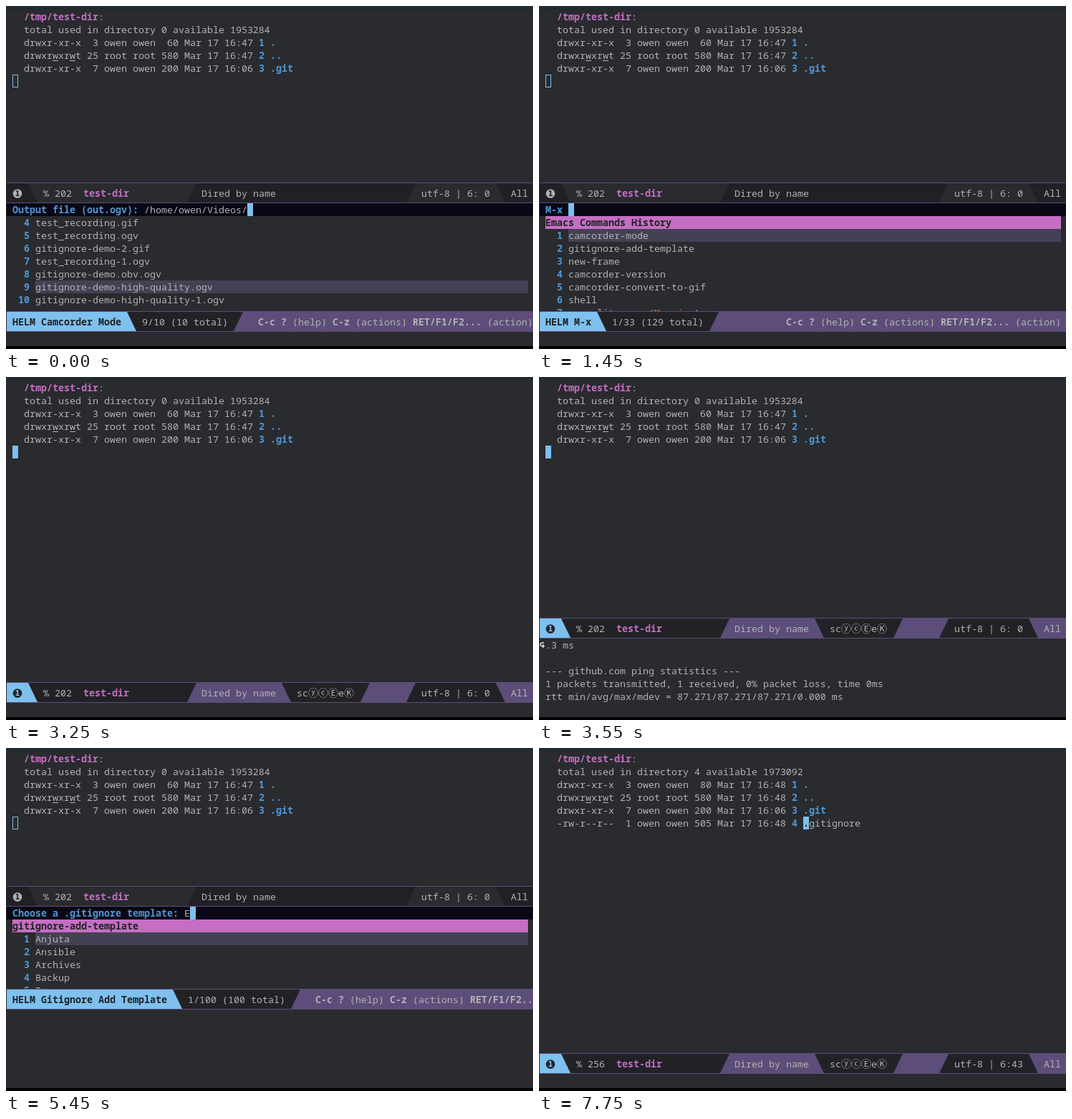
An HTML page for the animation above (8 s loop, 736 by 480 pixels).

```html
<!DOCTYPE html>
<html lang="en">
<head>
<meta charset="utf-8">
<title>Adding a gitignore template</title>
<style>
html, body { margin: 0; width: 100%; height: 100%; overflow: hidden; background: #292b2e; }
svg { display: block; width: 736px; height: 480px; }
text { font: 13.3333px "Noto Sans Mono", "DejaVu Sans Mono", monospace; fill: #b2b2b2; white-space: pre; }
.b, .blue, .pink, .dark { font-weight: bold; }
.blue, .match { fill: #4f97d7; }
.pink { fill: #c56ec3; }
.dark { fill: #222226; }
.ring { font: 14px "Noto Sans CJK JP", "Noto Sans CJK", "DejaVu Sans", sans-serif; }
.num { font: bold 10px "DejaVu Sans", sans-serif; text-anchor: middle; }
rect { shape-rendering: crispEdges; }
</style>
</head>
<body>
<svg id="stage" viewBox="0 0 736 480"></svg>
<script>
const LOOP = 8000, CHAR = 8, ROW = 18, BAR = 29, SLANT = 13;
const BG = '#292b2e', SKY = '#7ec0ee', VIOLET = '#5d4d7a', DARK = '#222226',
      DIM = '#212026', SELECT = '#444155', PINK = '#c56ec3', FG = '#b2b2b2';
const USER = 'owen';
const stage = document.getElementById('stage');
let out;

const rect = (x, y, w, h, fill) => out.push(`<rect x="${x}" y="${y}" width="${w}" height="${h}" fill="${fill}"/>`);
const poly = (points, fill) => out.push(`<polygon points="${points.join(' ')}" fill="${fill}"/>`);
const text = (x, y, s, cls = '') => out.push(`<text x="${x}" y="${y}" class="${cls}">${s}</text>`);

// Draws text, class, text, class... one after the other; returns the end.
function runs(x, y, ...parts) {
  for (let i = 0; i < parts.length; i += 2) {
    text(x, y, parts[i], parts[i + 1]);
    x += parts[i].length * CHAR;
  }
  return x;
}
const row = (x, y, ...parts) => runs(x, y + 14, ...parts);

function cursor(x, y, filled) {
  if (filled) rect(x, y, CHAR, ROW, SKY);
  else out.push(`<rect x="${x + .5}" y="${y + .5}" width="7" height="17" fill="none" stroke="${SKY}"/>`);
}

// Each segment is [top x, bottom x, fill] and reaches to the right edge.
function bar(y, ...segments) {
  rect(1, y, 735, BAR, VIOLET);
  for (const [top, bottom, fill] of segments)
    poly([[top, y + 1], [736, y + 1], [736, y + BAR - 1], [bottom, y + BAR - 1]], fill);
}

function listing(active, done) {
  const time = done ? '16:48' : '16:47';
  const file = (n, mode, links, owner, size, at, name, cls = 'blue') =>
    row(25, 24 + n * ROW, `${mode} ${links} ${owner} ${owner} ${size} Mar 17 ${at} `, '', n + ' ', 'blue', name, cls);
  row(25, 6, '/tmp/test-dir', 'pink', ':', '');
  row(25, 24, `total used in directory ${done ? '4 available 1973092' : '0 available 1953284'}`, '');
  file(1, 'drwxr-xr-x', ' 3', USER, done ? ' 80' : ' 60', time, '.');
  file(2, 'drwxrwxrwt', '25', 'root', '580', time, '..');
  file(3, 'drwxr-xr-x', ' 7', USER, '200', '16:06', '.git');
  rect(65, 76, CHAR, 1, FG);
  rect(89, 76, CHAR, 1, FG);
  if (!done) return cursor(9, 96, active);
  file(4, '-rw-r--r--', ' 1', USER, '505', '16:48', '.gitignore', '');
  cursor(369, 96, true);
  row(369, 96, '.', 'dark');
}

function diredBar(y, active, done) {
  const base = y + 20;
  if (active)
    bar(y, [1, 1, SKY], [31, 44, DARK], [266, 253, VIOLET], [385, 398, DARK],
      [508, 495, VIOLET], [572, 559, DARK], [684, 697, VIOLET]);
  else
    bar(y, [1, 1, DIM], [31, 44, BG], [266, 253, DIM], [572, 559, BG], [684, 697, DIM]);
  out.push(`<circle cx="16" cy="${y + 15.5}" r="6.3" fill="${active ? DARK : FG}"/>
    <text x="16" y="${y + 19}" class="num" style="fill:${active ? SKY : DIM}">1</text>`);
  runs(52, base, done ? '% 256  ' : '% 202  ', '', 'test-dir', 'pink');
  text(273, base, 'Dired by name');
  if (active) {
    text(406, base, 'sc');
    [...'ⓨⓒⒺ'].forEach((c, i) => text(422 + i * 14, base, c, 'ring'));
    text(464, base, 'e');
    text(472, base, 'Ⓚ', 'ring');
  }
  text(580, base, done ? 'utf-8 | 6:43' : 'utf-8 | 6: 0');
  text(705, base, 'All');
}

function helmBar(y, name, count) {
  const base = y + 20;
  const a = 9 + (name.length + 1) * CHAR, b = a + SLANT + (count.length + 2) * CHAR;
  bar(y, [1, 1, SKY], [a, a + SLANT, DARK], [b + SLANT, b, VIOLET]);
  text(9, base, name, 'dark');
  text(a + SLANT + CHAR, base, count);
  runs(Math.max(345, b + SLANT + 21), base, 'C-c ?', 'b', ' (help) ', '', 'C-z', 'b',
    ' (actions) ', '', 'RET/F1/F2...', 'b', ' (action)', '');
}

function prompt(y, label, typed) {
  rect(1, y, 735, ROW, '#0a0814');
  cursor(row(9, y, label + ' ', 'blue', typed, ''), y, true);
}

function header(y, title) {
  rect(9, y, 720, ROW, PINK);
  row(9, y, title, 'dark');
}

function item(y, n, name, { selected, match = 0, key = '' } = {}) {
  if (selected) rect(41, y, 688, ROW, SELECT);
  else if (match) rect(41, y, match * CHAR, ROW, '#293239');
  row(17, y, String(n).padStart(2), 'blue');
  const end = row(41, y, name.slice(0, match), 'match', name.slice(match), '');
  if (key) out.push(`<text x="${end}" y="${y + 14}"> (<tspan fill="#ce537a" style="fill:#dc752f">${key}</tspan>)</text>`);
}

const tildes = (y, n) => { while (n--) row(1, y + n * ROW, '~', ''); };

function outputFile() {
  listing(false);
  diredBar(247, false);
  prompt(276, 'Output file (out.ogv):', `/home/${USER}/Videos/`);
  ['test_recording.gif', 'test_recording.ogv', 'gitignore-demo-2.gif', 'test_recording-1.ogv',
   'gitignore-demo.obv.ogv', 'gitignore-demo-high-quality.ogv', 'gitignore-demo-high-quality-1.ogv']
    .forEach((name, i) => item(294 + i * ROW, i + 4, name, { selected: i === 5 }));
  helmBar(427, 'HELM Camcorder Mode', '9/10 (10 total)');
}

function dired(done) {
  listing(true, done);
  diredBar(427, true, done);
}

function commands(typed, filtered) {
  listing(false);
  diredBar(247, false);
  prompt(276, 'M-x', typed);
  header(294, 'Emacs Commands History');
  if (filtered) {
    item(312, 1, 'gitignore-add-template', { selected: true, match: 13 });
    header(348, 'Emacs Commands');
    item(366, 2, 'gitignore-add-template', { match: 13 });
    tildes(384, 2);
  } else {
    ['camcorder-mode', 'gitignore-add-template', 'new-frame', 'camcorder-version',
     'camcorder-convert-to-gif', 'shell']
      .forEach((name, i) => item(312 + i * ROW, i + 1, name, { selected: !i }));
    item(420, 7, 'sp-split-sexp', { key: 'M-m j s' });
  }
  helmBar(427, 'HELM M-x', filtered ? '1/1 (2 total)' : '1/33 (129 total)');
  rect(0, 456, 736, 20, BG);
}

function ping(shown) {
  listing(true);
  diredBar(337, true);
  if (!shown) return;
  out.push(`<path d="M7 372H4a2 2 0 0 0 0 4.500H6M5 374.500l2 2-2 2.500" fill="none" stroke="#ddd" stroke-width="1.500"/>`);
  row(9, 366, '.3 ms', '');
  ['--- github.com ping statistics ---',
   '1 packets transmitted, 1 received, 0% packet loss, time 0ms',
   'rtt min/avg/max/mdev = 87.271/87.271/87.271/0.000 ms']
    .forEach((s, i) => row(9, 402 + i * ROW, s, ''));
}

function templates(typed, filtered) {
  listing(false);
  diredBar(193, false);
  prompt(222, 'Choose a .gitignore template:', typed);
  header(240, 'gitignore-add-template');
  if (filtered) {
    item(258, 1, 'Emacs', { selected: true, match: 5 });
    tildes(276, 3);
  } else {
    ['Anjuta', 'Ansible', 'Archives', 'Backup', 'Bazaar']
      .forEach((name, i) => item(258 + i * ROW, i + 1, name, { selected: !i }));
  }
  helmBar(337, 'HELM Gitignore Add Template', filtered ? '1/1 (1 total)' : '1/100 (100 total)');
}

// Part of s typed after n of `steps` equal steps.
const typing = (s, n, steps) => s.slice(0, Math.max(0, Math.round(s.length * Math.min(1, n / steps))));

function scene(t) {
  if (t < 200) outputFile();
  else if (t < 1450) dired(false);
  else if (t < 3200) commands(typing('gitignore-add', (t - 1450) / 50, 4), t >= 1900);
  else if (t < 3400) dired(false);
  else if (t < 4750) ping(t < 4450);
  else if (t < 7550) templates(typing('Emacs', (t - 5400) / 50, 5), t >= 5750);
  else dired(true);
}

let last = -1;
function frame(now) {
  const t = Math.floor(now % LOOP / 50) * 50;
  if (t !== last) {
    last = t;
    out = [];
    rect(0, 0, 736, 480, BG);
    rect(0, 0, 736, 5, '#212b31');
    scene(t);
    rect(0, 476, 736, 4, '#000');
    stage.innerHTML = out.join('');
  }
  requestAnimationFrame(frame);
}
const start = performance.now();
const tick = () => Math.max(0, performance.now() - start);
requestAnimationFrame(function loop() { frameAt(); requestAnimationFrame(loop); });
function frameAt() {
  const raf = window.requestAnimationFrame;
  window.requestAnimationFrame = () => 0;
  frame(tick());
  window.requestAnimationFrame = raf;
}
</script>
</body>
</html>
```
